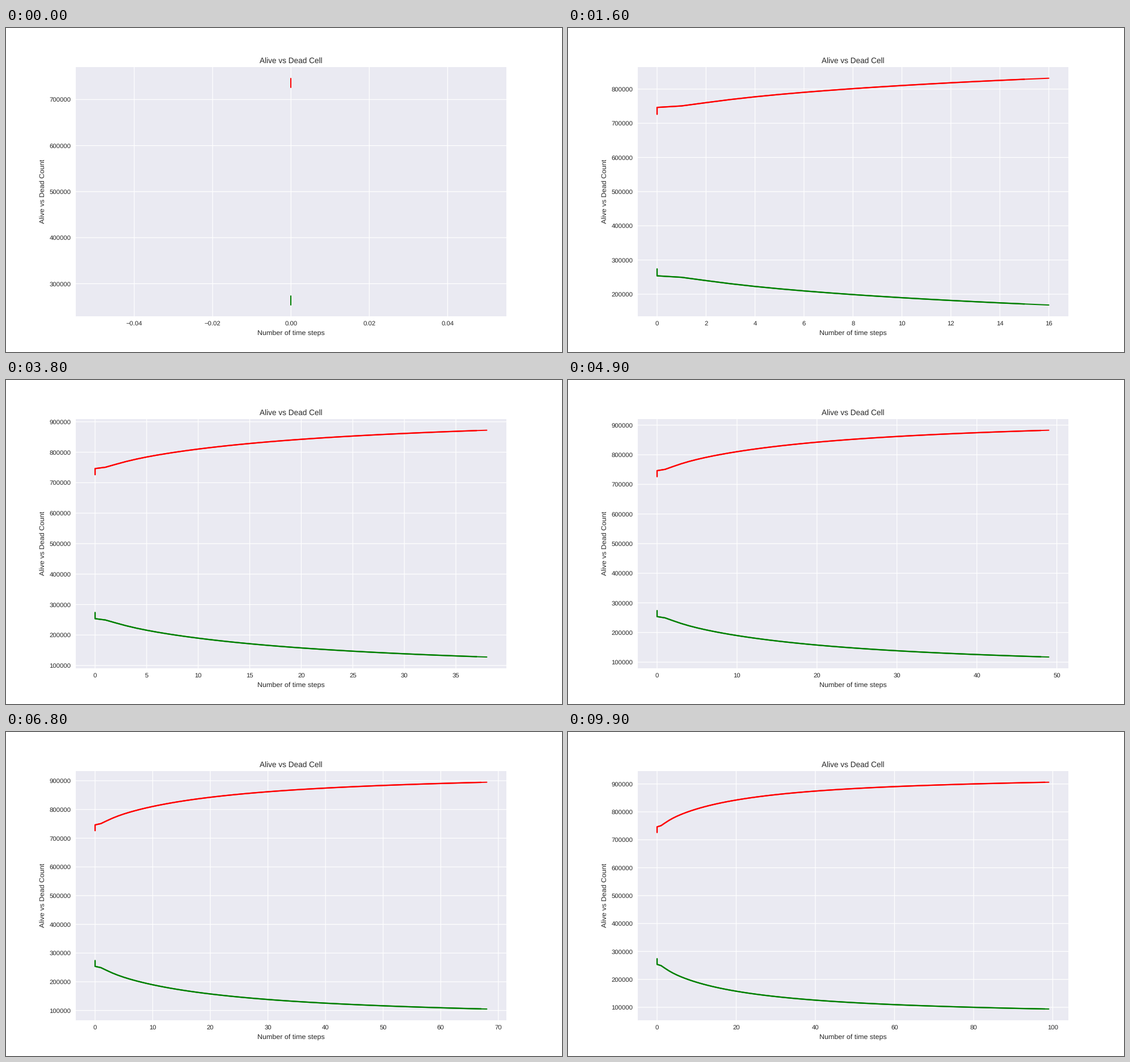
A matplotlib script for the animation above (10 s loop, 980 by 572 pixels).

```python
import numpy as np
import matplotlib.pyplot as plt
from matplotlib.animation import FuncAnimation

STEPS = 100
TOTAL = 1e6
START = 273700  # living cells before the first step
PT = 980 / 960  # a 12 inch wide layout drawn at 80 dpi

plt.rcParams.update({
    "font.family": "Liberation Sans",
    "text.hinting": "no_hinting",
    "text.color": ".15",
    "axes.labelcolor": ".15",
    "axes.facecolor": "#EAEAF2",
    "axes.linewidth": 0,
    "axes.labelsize": 11 * PT,
    "axes.labelpad": 5.5 * PT,
    "axes.titlesize": 12 * PT,
    "axes.titlepad": 6 * PT,
    "axes.axisbelow": True,
    "lines.solid_capstyle": "round",
    "grid.color": "white",
    "grid.linewidth": 1.1 * PT,
})
for side in "xy":
    plt.rcParams.update({
        f"{side}tick.color": ".15",
        f"{side}tick.labelsize": 10 * PT,
        f"{side}tick.major.size": 0,
        f"{side}tick.major.pad": 7 * PT,
    })


def survivors(n):
    """Living cells after step n: hyperbolic decay with a slow first step."""
    return 61500 + 192200 / (1 + n / 20) + 13000 * n * np.exp(-n)


# The starting count and step 0 share x = 0
steps = np.arange(STEPS)
x = np.r_[0, steps]
alive = np.r_[START, survivors(steps)]
dead = TOTAL - alive

fig, ax = plt.subplots(figsize=(12.25, 7.15), dpi=80, facecolor="white")
fig.subplots_adjust(left=0.125, right=0.9, bottom=0.11, top=0.88)
for spine in ax.spines.values():
    spine.set_visible(False)
ax.grid(True, snap=False)
ax.set_title("Alive vs Dead Cell")
ax.set_xlabel("Number of time steps")
ax.set_ylabel("Alive vs Dead Count")


def curve(data, color):
    """A full line plus a slightly heavier one for all but the newest step."""
    full, = ax.plot([], [], color, lw=1.75 * PT)
    past, = ax.plot([], [], color, lw=2.1 * PT)
    return data, full, past


curves = [curve(dead, "red"), curve(alive, "green")]


def update(i):
    for data, full, past in curves:
        full.set_data(x[:i + 2], data[:i + 2])
        past.set_data(x[:i + 1], data[:i + 1])
        past.set_visible(i > 0)
    pad = 0.05 * i or 0.055
    ax.set_xlim(-pad, i + pad)
    low, high = alive[i + 1], dead[i + 1]
    pad = 0.05 * (high - low)
    ax.set_ylim(low - pad, high + pad)
    return []


anim = FuncAnimation(fig, update, frames=STEPS, interval=100,
                     init_func=lambda: update(0), repeat=True,
                     repeat_delay=0, blit=False)
plt.show()
```
